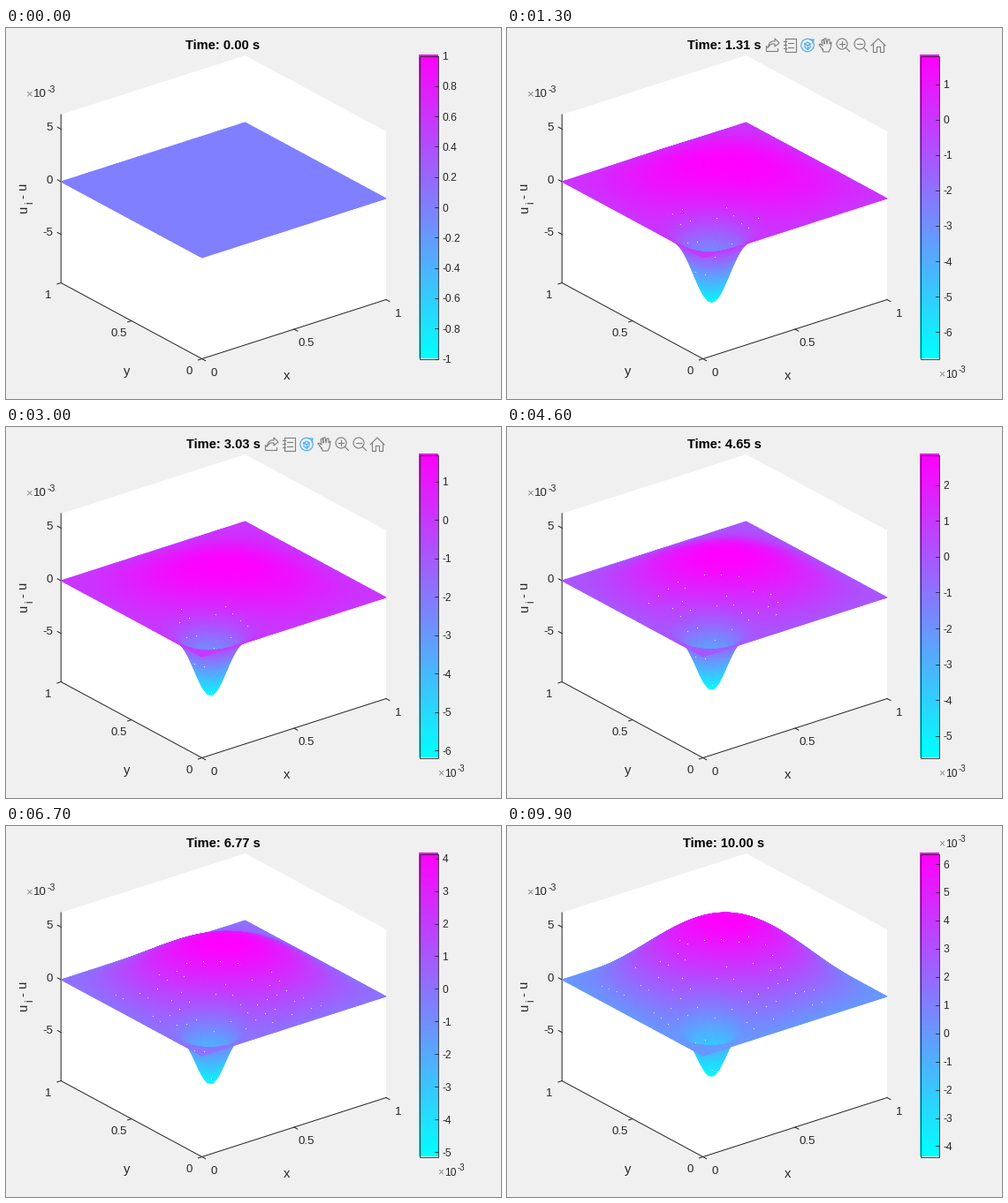
Recreate the animation shown at these times as a matplotlib script. Size 560 px wide and 420 px high, loop 10 s.

```python
import numpy as np
import matplotlib.pyplot as plt
from matplotlib.animation import FuncAnimation
from matplotlib.patches import Circle, Polygon, Rectangle

plt.rcParams["font.family"] = "Liberation Sans"
W, H, FRAMES = 560, 420, 100
INK, GRAY, BLUE = "#262626", "#7d7d7d", "#3fa9f5"
ORIGIN = np.array([221.7, 260.0])
EX, EY = np.array([208.3, -67.0]), np.array([-159.5, -86.0])
ZPX = 11.93  # pixels per 1e-3
TOP, BOTTOM = 76, 114.5

fig = plt.figure(figsize=(W / 100, H / 100), dpi=100, facecolor="#f0f0f0")
ax = fig.add_axes([0, 0, 1, 1])
ax.set_xlim(0, W)
ax.set_ylim(H, 0)
ax.axis("off")


def project(x, y, z=0.0):
    return (ORIGIN[0] + EX[0] * x + EY[0] * y,
            ORIGIN[1] + EX[1] * x + EY[1] * y - ZPX * z)


def text(x, y, s, px, ha="center", color=INK, **kw):
    return ax.text(x, y, s, fontsize=px * 0.72, ha=ha, color=color,
                   va=kw.pop("va", "center_baseline"), **kw)


def line(xs, ys, color=INK, lw=0.72, **kw):
    return ax.plot(xs, ys, color=color, lw=lw, **kw)[0]


def exponent(x, y, px, power=-3):
    return [text(x, y, "×", px, "left", "#8a8a8a"),
            text(x + 0.7 * px, y, "10", px, "left"),
            text(x + 1.85 * px, y - 0.38 * px, str(power), px * 0.8, "left")]


# Error surface in units of 1e-3
def bump_at(t):
    return (6.5 + 0.69 * (t - 10) + 0.4 * np.exp(-3 * t)
            + 1.4 * np.exp(-((t - 1.3) / 0.6) ** 2)
            + 0.2 * np.exp(-((t - 4) / 1.3) ** 2))


def odd_gauss(v, s):
    return np.exp(-(v - 0.2) ** 2 / (2 * s * s)) - np.exp(-(v + 0.2) ** 2 / (2 * s * s))


def surface(x, y, t):
    if t == 0:
        return np.zeros_like(x)
    swing = 1 - np.exp(-0.7 * t - 0.15 * t * t) * np.cos(3.2 * t)
    power = 1 - 0.25 * np.exp(-((t - 1.3) / 0.7) ** 2)
    base = np.clip(np.sin(np.pi * x) * np.sin(np.pi * y), 0, 1) ** power
    s = 0.065 + 0.03 * np.exp(-t / 1.2)
    dip = 5.5 * odd_gauss(x, s) * odd_gauss(y, s)
    tail = 1.5 * odd_gauss(x, 0.2) * odd_gauss(y, 0.2)
    return bump_at(t) * base - swing * (dip + tail)


def draw_box():
    c00, c10, c01, c11 = (np.array(project(*c)) for c in ((0, 0), (1, 0), (0, 1), (1, 1)))
    up, down = np.array([0, -TOP]), np.array([0, BOTTOM])
    ax.add_patch(Polygon([c01 + up, c11 + up, c10 + up, c10 + down, c00 + down, c01 + down],
                         fc="white", lw=0, zorder=0))
    path = np.array([c01 + up, c01 + down, c00 + down, c10 + down])
    line(*path.T, zorder=1)
    out_y, out_x = -EY / np.hypot(*EY) * 4.5, -EX / np.hypot(*EX) * 4.5

    def tick(p, d):
        line([p[0], p[0] + d[0]], [p[1], p[1] + d[1]], zorder=1)

    for v, name in zip((0, 0.5, 1), ("0", "0.5", "1")):
        px, py = c00 + down + v * EX, c00 + down + v * EY
        tick(px, out_y)
        tick(py, out_x)
        text(px[0] + 13.5, px[1] + 15, name, 13.3)
        text(py[0] - 14.5, py[1] + 13, name, 13.3)
    for v in (-5, 0, 5):
        p = c01 - np.array([0, v * ZPX])
        tick(p, -out_y)
        text(53, p[1] - 3, str(v), 13.3, "right")
    text(318, 393, "x", 14.7)
    text(137, 388, "y", 14.7)
    for x, y, s, px in ((20, 205, "u", 14.7), (27, 197.5, "i", 11.7), (20, 184, "- u", 14.7)):
        text(x, y, s, px, rotation=90, va="center")
    exponent(22, 74, 13.3)


def draw_toolbar():
    items = []

    def stroke(xs, ys, color=GRAY):
        items.append(line(xs, ys, color, 0.8))

    def ring(x, y, r, color=GRAY):
        items.append(ax.add_patch(Circle((x, y), r, fill=False, ec=color, lw=0.8)))

    # export
    stroke([293, 293, 306, 306], [20, 26, 26, 23])
    stroke([295, 297, 300, 303, 303, 308, 303, 303, 299, 295],
           [22, 17, 15, 15, 12, 17, 21, 18, 18, 22])
    # notes
    stroke([315, 327, 327, 315, 315], [12, 12, 27, 27, 12])
    for y in (17, 22):
        stroke([318, 324], [y, y])
    for y in (15, 19, 23):
        stroke([313, 316], [y, y])
    # rotate
    ring(340, 19.5, 7.2, BLUE)
    stroke([337, 340, 343, 343, 340, 337, 337], [18, 16, 18, 22, 24, 22, 18], BLUE)
    stroke([337, 340, 343], [18, 20, 18], BLUE)
    stroke([340, 340], [20, 24], BLUE)
    stroke([343, 347, 346], [13, 13, 17], BLUE)
    # hand
    stroke([357, 353, 354, 357, 356, 358, 359, 359, 361, 362, 363, 365, 365, 367, 366, 364, 358, 357],
           [24, 19, 18, 20, 14, 13, 18, 12, 12, 18, 13, 13, 18, 16, 23, 27, 27, 24])
    # zoom in and out
    for x in (379, 399):
        ring(x, 18, 6)
        stroke([x + 4.3, x + 8.5], [22.3, 26.5])
        stroke([x - 3, x + 3], [18, 18])
    stroke([379, 379], [15, 21])
    # home
    stroke([412, 420, 428], [20, 12, 20])
    stroke([414, 414, 418, 418, 422, 422, 426, 426], [18, 27, 27, 21, 21, 27, 27, 18])
    return items


def draw_colorbar():
    ax.imshow(np.linspace(1, 0, 343)[:, None], cmap="cool", extent=(467, 488.5, 374.5, 31),
              aspect="auto", interpolation="nearest", zorder=2)
    ax.add_patch(Rectangle((467.5, 31.5), 21, 343, fill=False, ec=INK, lw=0.6, zorder=3))
    ax.set_xlim(0, W)
    ax.set_ylim(H, 0)


def colorbar_ticks(lo, hi, flat):
    power = 0 if flat else int(np.floor(np.log10(max(-lo, hi)))) - 3
    scale = 1 if flat else 10.0 ** (power + 3)
    a, b = lo / scale, hi / scale
    step = next(s for s in (0.1, 0.2, 0.5, 1, 2, 5) if (b - a) / s <= 11.5)
    items = []
    for k in range(int(np.ceil(a / step - 1e-9)), int(np.floor(b / step + 1e-9)) + 1):
        y = 374.5 - 343 * (k * step - a) / (b - a)
        items.append(line([484.5, 488.5], [y, y], lw=0.6, zorder=4))
        items.append(text(493.5, y, f"{k * step:g}", 12, "left"))
    if not flat:
        items += exponent(488, 19 if hi > -lo else 391, 12, power)
    return items


axis_pts = np.linspace(1, 0, 61)
GX, GY = np.meshgrid(axis_pts, axis_pts)  # far to near
nodes = np.linspace(0, 1, 20)[1:-1]
NX, NY = np.meshgrid(nodes, nodes)
keep = np.random.default_rng(4).random(NX.shape) < 0.55

draw_box()
draw_colorbar()
toolbar = draw_toolbar()
title = text(245.5, 18, "", 14.6, color="black", weight="bold")
specks = ax.plot([], [], ls="", marker="s", ms=0.75, mew=0, color="#f3f3d2", zorder=6)[0]
live = []


def update(i):
    while live:
        live.pop().remove()
    t = 10 * i / (FRAMES - 1)
    z = surface(GX, GY, t)
    flat = i == 0
    lo, hi = (-1, 1) if flat else (z.min(), z.max())
    live.append(ax.pcolormesh(*project(GX, GY, z), z, cmap="cool", vmin=lo, vmax=hi,
                              shading="gouraud", zorder=5))
    live.extend(colorbar_ticks(lo, hi, flat))

    # pinholes between facets that lean towards the viewer
    d = 0.01
    slope = (surface(NX + d, NY + d, t) - surface(NX - d, NY - d, t)) / (2 * d)
    hit = keep & (slope > 8.5)
    specks.set_data(*project(NX[hit], NY[hit], surface(NX[hit], NY[hit], t)))

    title.set_text(f"Time: {t:.2f} s")
    for item in toolbar:
        item.set_visible(12 <= i < 38)
    return []


anim = FuncAnimation(fig, update, frames=FRAMES, init_func=lambda: [],
                     interval=100, repeat=True, repeat_delay=0)
plt.show()
```
